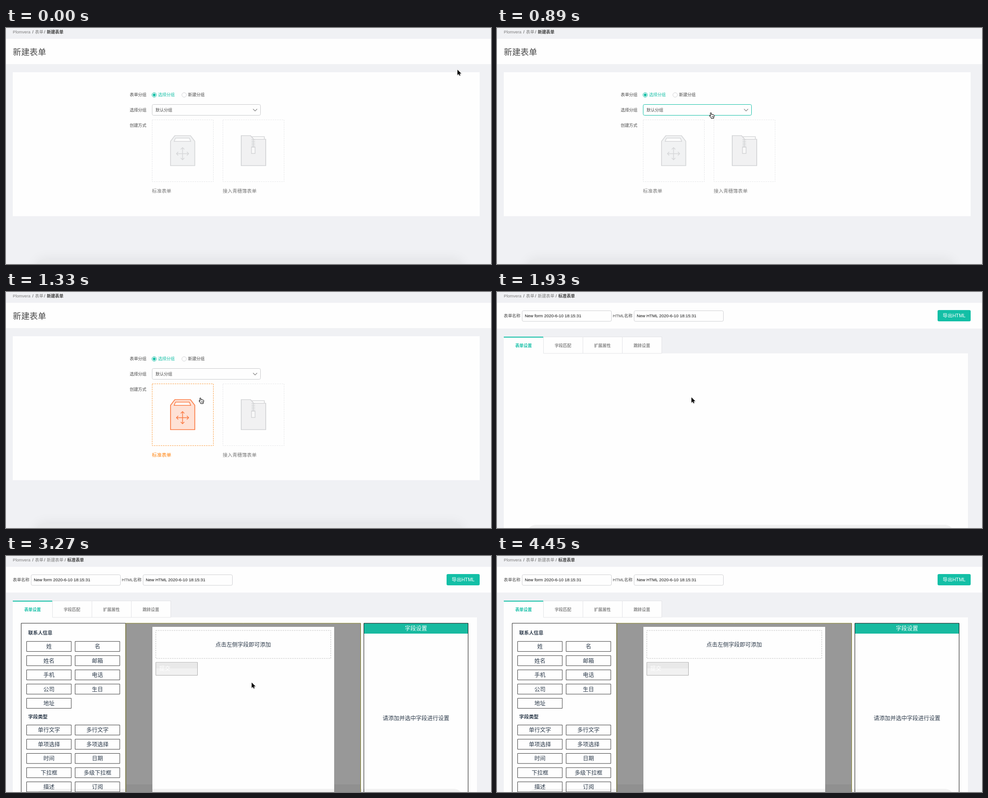
Recreate the animation shown at these times as an HTML page with a canvas. Size 1070 px wide and 523 px high, loop 5110 ms.

```html
<!DOCTYPE html>
<html lang="zh-CN">
<head>
<meta charset="utf-8">
<title>新建表单</title>
<style>
  html, body { margin: 0; width: 100%; height: 100%; overflow: hidden; background: #f0f1f4; }
  canvas { display: block; width: 1070px; height: 523px; }
</style>
</head>
<body>
<canvas id="stage" width="1070" height="523"></canvas>
<script>
const ctx = document.getElementById('stage').getContext('2d');
const LOOP = 5110;
const FONT = '"Liberation Sans", "Noto Sans CJK SC", "Noto Sans CJK", sans-serif';
const SMALL = 9.2, MEDIUM = 10.7, LARGE = 12.25;
const BG = '#f0f1f4', WHITE = '#fefefe', GREEN = '#13bfa6', INK = '#4a4a4a', FIELD_INK = '#2c3a4a';

// Pointer positions: start time, shape, left, top
const POINTER = [
  [0, 'arrow', 995, 92], [150, 'arrow', 980, 95], [300, 'arrow', 676, 165],
  [440, 'arrow', 525, 189], [590, 'hand', 503, 185], [740, 'hand', 483, 176],
  [890, 'hand', 468, 187], [1030, 'hand', 440, 222], [1180, 'hand', 427, 234],
  [1330, 'hand', 425, 234], [1930, 'arrow', 428, 233], [3270, 'arrow', 541, 280],
  [3410, 'arrow', 674, 347], [3560, 'arrow', 729, 371], [3710, 'arrow', 796, 407],
  [3860, 'arrow', 807, 411], [4010, 'arrow', 755, 402], [4150, 'arrow', 738, 404],
  [4300, 'arrow', 867, 481], [4450, 'none', 0, 0]
];
const SHAPES = {
  arrow: new Path2D('M1 .5V12.2L3.7 9.7 5.5 13.6 7.4 12.7 5.7 9H9.4Z'),
  hand: new Path2D('M3.1 8.2L2.6 2Q2.6.7 3.7.7 4.8.7 4.9 2L5.2 5.2Q6 4.2 7 5 8 4.3 8.9 5.3 ' +
    '10.7 4.9 11.2 6.6 11.3 9.5 10 11.2V13.3H4.6L4.4 12Q2.5 10 1 7.8.6 6.5 1.8 6.8Z'),
  fingers: new Path2D('M6 8.2V11M7.6 8.2V11M9.1 8.2V11')
};

function text(str, x, cy, size, color, { align = 'left', weight = 400 } = {}) {
  ctx.font = `${weight} ${size}px ${FONT}`;
  ctx.textAlign = align;
  ctx.fillStyle = color;
  ctx.fillText(str, x, cy + size * 0.37);
}

function fill(x, y, w, h, color) {
  ctx.fillStyle = color;
  ctx.fillRect(x, y, w, h);
}

function box(x, y, w, h, { stroke, background, radius = 0, dash = [], line = 1 }) {
  ctx.beginPath();
  ctx.roundRect(x, y, w, h, radius);
  if (background) { ctx.fillStyle = background; ctx.fill(); }
  if (stroke) {
    ctx.strokeStyle = stroke;
    ctx.lineWidth = line;
    ctx.setLineDash(dash);
    ctx.stroke();
    ctx.setLineDash([]);
  }
}

function shape(d, stroke, background, line = 1.7) {
  const path = new Path2D(d);
  if (background) { ctx.fillStyle = background; ctx.fill(path); }
  ctx.strokeStyle = stroke;
  ctx.lineWidth = line;
  ctx.stroke(path);
}

function page(crumbs, headerBottom) {
  fill(0, 0, 1070, 523, BG);
  fill(0, 24, 1070, headerBottom - 24, WHITE);
  text('Plomvera', 15, 9, SMALL, '#7d7d7d');
  const starts = [64, 90, 135.3];
  crumbs.forEach((crumb, i) => {
    const last = i === crumbs.length - 1;
    text('/', starts[i] - 6, 9, SMALL, '#444');
    text(crumb, starts[i], 9, SMALL, last ? '#3c3c3c' : '#7d7d7d', { weight: last ? 700 : 400 });
  });
}

function radio(x, y, label, on) {
  ctx.beginPath();
  ctx.arc(x, y, 5, 0, Math.PI * 2);
  ctx.strokeStyle = on ? GREEN : '#d2d3d6';
  ctx.lineWidth = 1;
  ctx.stroke();
  if (on) {
    ctx.beginPath();
    ctx.arc(x, y, 3.1, 0, Math.PI * 2);
    ctx.fillStyle = GREEN;
    ctx.fill();
  }
  text(label, x + 8.5, 148, SMALL, on ? GREEN : INK);
}

function bagIcon(stroke, background) {
  shape('M363 305V251L372.5 238.5H407L416.5 251V305Z', stroke, background);
  shape('M374 244H404.5L407.5 251.3H371Z', stroke, WHITE, 1.5);
  shape('M376.5 278.5H402.5M389.5 265.5V291.5M380 274.5L376 278.5 380 282.5M399 274.5L403 278.5 399 282.5' +
    'M385.5 269L389.5 265 393.5 269M385.5 288L389.5 292 393.5 288', stroke, null, 1.5);
}

function folderIcon() {
  const gray = '#d2d3d5';
  shape('M538 241H570V249H538Z', gray, WHITE, 1.5);
  shape('M519 305V238.5H539.5L546.5 246.5H573V305Z', gray, '#f1f1f2');
  for (let y = 247; y < 264; y += 4) shape(`M541.5 ${y}H549.5`, gray, null, 1.4);
  shape('M545.5 246V264', gray, null, 1.2);
  shape('M541.5 264H549.5V278H541.5Z', gray, '#f8f8f8', 1.4);
}

function bottomPlate() {
  ctx.save();
  ctx.shadowColor = 'rgba(0,0,0,.07)';
  ctx.shadowBlur = 28;
  box(66, 513, 942, 60, { background: '#e9eaec', radius: 18 });
  ctx.restore();
}

function chooser(t) {
  page(['表单', '新建表单'], 80);
  text('新建表单', 15, 53, 18.4, INK);
  bottomPlate();
  fill(15, 98, 1030, 319, WHITE);

  text('表单分组', 273, 148, SMALL, INK);
  radio(327, 148.3, '选择分组', true);
  radio(393, 148.3, '新建分组', false);

  const selectHover = t >= 590 && t < 1030;
  text('选择分组', 273, 181.7, SMALL, INK);
  box(322.5, 169.5, 239, 24, { stroke: selectHover ? GREEN : '#c9cacc', radius: 3 });
  text('默认分组', 330, 181.7, SMALL, INK);
  shape('M545 179.3L549.5 184 554 179.3', '#777', null, 1.1);

  const cardHover = t >= 1030;
  const border = t >= 1180 ? '#fb9a3c' : cardHover ? '#f3bf8e' : '#e3e4e6';
  text('创建方式', 273, 215.5, SMALL, INK);
  box(322.5, 203.5, 135, 137, { stroke: border, dash: [3, 2] });
  box(478.5, 203.5, 135, 137, { stroke: '#e6e7e9', dash: [3, 2] });
  if (cardHover) bagIcon('#fb7840', '#fee1d5');
  else bagIcon('#d5d6d8', '#f1f2f3');
  folderIcon();
  text('标准表单', 322, 361, MEDIUM, cardHover ? '#ff8410' : '#7a7a7a');
  text('接入青穗簿表单', 478, 361, MEDIUM, '#7a7a7a');
}

function labelledInput(label, labelX, x, value) {
  text(label, labelX, 52.5, SMALL, INK);
  box(x + .5, 41.5, 197, 23.5, { stroke: '#cfd0d3', radius: 3 });
  text(value, x + 6.3, 53, 9.4, '#111');
}

function fieldGrid(top, names) {
  names.forEach((name, i) => {
    const x = i % 2 ? 152.5 : 45.5, y = top + Math.floor(i / 2) * 31.5;
    box(x, y, 98.5, 22.3, { stroke: '#3a3a3a' });
    text(name, x + 49.3, y + 11.2, LARGE, FIELD_INK, { align: 'center' });
  });
}

function workspace() {
  box(33.5, 149, 230.5, 400, { stroke: '#222' });
  text('联系人信息', 49, 170.3, MEDIUM, FIELD_INK, { weight: 700 });
  fieldGrid(189.3, ['姓', '名', '姓名', '邮箱', '手机', '电话', '公司', '生日', '地址']);
  text('字段类型', 49, 355.7, MEDIUM, FIELD_INK, { weight: 700 });
  fieldGrid(374.5, ['单行文字', '多行文字', '单项选择', '多项选择', '时间', '日期',
    '下拉框', '多级下拉框', '描述', '订阅']);

  box(264.5, 149, 518, 400, { stroke: '#827f21', background: '#989898' });
  fill(265, 506, 517, 17, '#909090');
  fill(323, 157, 401, 366, WHITE);
  fill(323, 516, 401, 7, '#f1f1f1');
  box(330.5, 165, 386, 62, { stroke: '#bfbfbf', dash: [3, 2] });
  text('点击左侧字段即可添加', 523.3, 196, LARGE, FIELD_INK, { align: 'center' });
  box(330.5, 235.7, 92, 28.7, { stroke: '#acacac', background: '#f1f1f1' });
  fill(331, 236, 91, 13, '#e9e9e9');
  text('提交', 338, 249.5, LARGE, '#fff');

  fill(790, 149, 230, 23, '#18baa0');
  box(789.5, 149, 230, 400, { stroke: '#111' });
  text('字段设置', 904.5, 160.5, LARGE, '#fff', { align: 'center' });
  text('请添加并选中字段进行设置', 904.5, 359, LARGE, FIELD_INK, { align: 'center' });
}

function editor(t) {
  page(['表单', '新建表单', '标准表单'], 81);
  labelledInput('表单名称', 15, 55, 'New form 2020-6-10 18:15:31');
  labelledInput('HTML名称', 255.5, 302, 'New HTML 2020-6-10 18:15:31');
  box(972, 40, 73, 25, { background: GREEN, radius: 3 });
  text('导出HTML', 1008.5, 52.5, MEDIUM, '#fff', { align: 'center', weight: 500 });

  fill(15, 136, 1024, 387, WHITE);
  ['表单设置', '字段匹配', '扩展属性', '跳转设置'].forEach((name, i) => {
    const x = 15 + i * 87, active = i === 0;
    if (active) {
      fill(x, 99, 87, 38, WHITE);
      fill(x, 99, 87, 2, GREEN);
    } else {
      box(x + .5, 99.5, 87, 36.5, { stroke: '#e2e3e6', background: WHITE });
    }
    text(name, x + 43.5, 118.7, SMALL, active ? GREEN : '#8a8a8a', { align: 'center', weight: 700 });
  });
  box(66, 516, 942, 60, { background: '#f1f1f1', radius: 20 });
  if (t >= 2070) workspace();
}

function pointer(t) {
  const [, kind, x, y] = POINTER.findLast(step => t >= step[0]);
  if (kind === 'none') return;
  ctx.save();
  ctx.translate(x, y);
  ctx.lineJoin = 'round';
  const arrow = kind === 'arrow';
  ctx.strokeStyle = arrow ? '#fff' : '#111';
  ctx.fillStyle = arrow ? '#000' : '#fff';
  ctx.lineWidth = arrow ? 1.4 : 1;
  if (arrow) {
    ctx.shadowColor = 'rgba(0,0,0,.3)';
    ctx.shadowBlur = 1.5;
    ctx.shadowOffsetY = .5;
  }
  ctx.stroke(SHAPES[kind]);
  ctx.shadowColor = 'transparent';
  ctx.fill(SHAPES[kind]);
  if (!arrow) {
    ctx.stroke(SHAPES.hand);
    ctx.lineWidth = .7;
    ctx.stroke(SHAPES.fingers);
  }
  ctx.restore();
}

const start = performance.now();
function draw() {
  const t = (performance.now() - start) % LOOP;
  if (t < 1930) chooser(t);
  else editor(t);
  pointer(t);
  requestAnimationFrame(draw);
}
draw();
</script>
</body>
</html>
```
